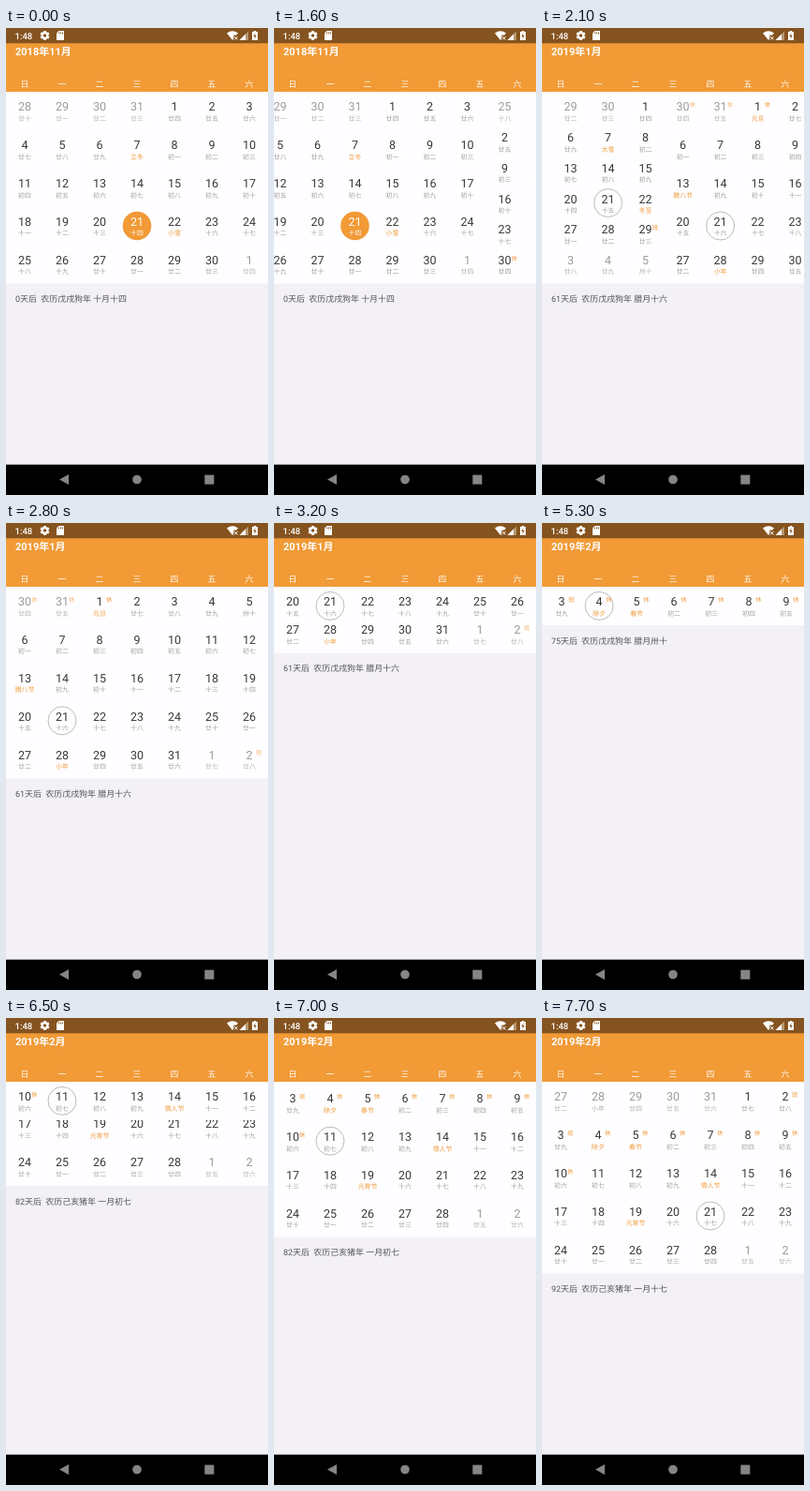
Write an HTML page with a canvas that moves like this. It is 280 by 498 pixels and loops after 8000 ms.

```html
<!DOCTYPE html>
<html lang="zh-CN">
<head>
<meta charset="utf-8">
<title>日历</title>
<style>
html, body { margin: 0; width: 100%; height: 100%; overflow: hidden; background: #f3f1f5; }
canvas { display: block; width: 280px; height: 498px; }
</style>
</head>
<body>
<canvas id="stage"></canvas>
<script>
const W = 280, H = 498, LOOP = 8000, STEP = 100;
const TOP = 68, FULL = 272.5, WEEK = 109, FOLD = FULL - WEEK;
const COLUMN = W / 7, FIRST_ROW = 84;
const ORANGE = '#f19a36', PAPER = '#fefdff';
const FONT = 'Roboto, "Noto Sans CJK SC", "Noto Sans CJK", sans-serif';

const canvas = document.getElementById('stage');
const ctx = canvas.getContext('2d');
const ratio = window.devicePixelRatio || 1;
canvas.width = W * ratio;
canvas.height = H * ratio;
ctx.textRendering = 'geometricPrecision';

// Dates are whole day numbers.
const day = (y, m, d) => Date.UTC(y, m - 1, d) / 864e5;
const parts = n => {
  const date = new Date(n * 864e5);
  return { y: date.getUTCFullYear(), m: date.getUTCMonth() + 1, d: date.getUTCDate(), w: date.getUTCDay() };
};

const TODAY = day(2018, 11, 21);
const NEW_YEAR = day(2019, 2, 5);
const LUNAR_MONTHS = [
  [NEW_YEAR, '一月'], [day(2019, 1, 6), '腊月'], [day(2018, 12, 7), '冬月'],
  [day(2018, 11, 8), '十月'], [day(2018, 10, 9), '九月']
];
const FESTIVALS = {
  '11-7': '立冬', '11-22': '小雪', '12-7': '大雪', '12-22': '冬至', '12-25': '圣诞节',
  '1-1': '元旦', '1-13': '腊八节', '1-28': '小年', '2-4': '除夕', '2-5': '春节',
  '2-14': '情人节', '2-19': '元宵节'
};

function lunar(n) {
  const [start, month] = LUNAR_MONTHS.find(([first]) => n >= first);
  const d = n - start + 1;
  const tens = d === 10 ? '初' : '初十廿卅'[Math.floor(d / 10)];
  return { month, name: tens + '十一二三四五六七八九'[d % 10] };
}

// Days off run around each new year; a working day stands beside them.
function mark(n) {
  const solar = n - day(2019, 1, 1), spring = n - NEW_YEAR;
  if (solar === -3 || spring === -3 || spring === -2) return '班';
  if ((solar >= -2 && solar <= 0) || (spring >= -1 && spring <= 5)) return '休';
  return '';
}

// Each gesture eases its axes by a distance; its pick applies halfway through.
const GESTURES = [
  { start: 1346, span: 700, month: W, pick: day(2018, 12, 21) },
  { start: 1742, span: 700, month: W, pick: day(2019, 1, 21) },
  { start: 2750, span: 700, fold: FOLD },
  { start: 4120, span: 500, week: W, pick: day(2019, 1, 28) },
  { start: 4850, span: 500, week: W, month: W, pick: day(2019, 2, 4) },
  { start: 5420, span: 400, week: W, pick: day(2019, 2, 11) },
  { start: 6243, span: 400, fold: -FOLD + 78 },
  { start: 6750, span: 500, fold: -78 },
  { start: 7700, span: 0, pick: day(2019, 2, 21) }
];

const easeInOut = u => u < 0.5 ? 4 * u ** 3 : 1 - 4 * (1 - u) ** 3;

function offset(axis, t) {
  return GESTURES.filter(g => g[axis]).reduce((sum, g) => {
    const u = Math.min(1, Math.max(0, (t - g.start) / g.span));
    return sum + g[axis] * easeInOut(u);
  }, 0);
}

function selectedAt(t) {
  const done = GESTURES.filter(g => g.pick && t >= g.start + g.span / 2);
  return done.length ? done.pop().pick : TODAY;
}

function rect(x, y, w, h, color) {
  ctx.fillStyle = color;
  ctx.fillRect(x, y, w, h);
}

function text(str, x, baseline, size, color, align = 'center', weight = 400) {
  ctx.font = `${weight} ${size}px ${FONT}`;
  ctx.textAlign = align;
  ctx.fillStyle = color;
  ctx.fillText(str, x, baseline);
}

function shape(points, color) {
  ctx.beginPath();
  points.forEach(([x, y]) => ctx.lineTo(x, y));
  ctx.closePath();
  ctx.fillStyle = color;
  ctx.fill();
}

function disc(x, y, r, color) {
  ctx.beginPath();
  ctx.arc(x, y, r, 0, Math.PI * 2);
  ctx.fillStyle = color;
  ctx.fill();
}

function ring(x, y, r, color) {
  ctx.beginPath();
  ctx.arc(x, y, r, 0, Math.PI * 2);
  ctx.strokeStyle = color;
  ctx.lineWidth = 0.8;
  ctx.stroke();
}

function clipped(y, h, draw) {
  ctx.save();
  ctx.beginPath();
  ctx.rect(0, y, W, h);
  ctx.clip();
  draw();
  ctx.restore();
}

function drawDay(n, x, y, selected, faded) {
  const { m, d } = parts(n);
  const festival = FESTIVALS[m + '-' + d];
  const filled = selected && n === TODAY;
  if (filled) disc(x, y + 4.4, 15.3, ORANGE);
  else if (selected) ring(x, y + 4.4, 15, '#aaa9ac');

  const ink = filled ? '#fff' : faded ? '#9b9a9d' : '#383838';
  const note = filled ? '#fff' : faded ? '#b2b1b4' : festival ? ORANGE : '#a09fa2';
  text(d, x, y + 4.4, 12.5, ink);
  text(festival || lunar(n).name, x, y + 14.8, 6.9, note);
  ctx.globalAlpha = faded ? 0.7 : 1;
  text(mark(n), x + 10.3, y, 6.4, ORANGE);
  ctx.globalAlpha = 1;
}

function drawWeek(first, x, y, selected, month) {
  for (let i = 0; i < 7; i++) {
    const n = first + i;
    drawDay(n, x + (i + 0.5) * COLUMN, y, n === selected, month && parts(n).m !== month);
  }
}

function monthGrid(y, m) {
  const start = day(y, m, 1), lead = parts(start).w;
  const rows = Math.ceil((lead + day(y, m + 1, 1) - start) / 7);
  return { m, first: start - lead, rows, pitch: FOLD / (rows - 1), pick: day(y, m, 21) };
}

const MONTHS = [monthGrid(2018, 11), monthGrid(2018, 12), monthGrid(2019, 1), monthGrid(2019, 2)];
const FIRST_WEEK = day(2019, 1, 20);

function drawPages(scroll, drawPage) {
  for (let i = 0; i < 4; i++) {
    const x = i * W - scroll;
    if (Math.abs(x) < W) drawPage(i, x);
  }
}

function drawCalendar(t, selected) {
  const fold = offset('fold', t), scroll = offset('month', t);
  const bottom = FULL - fold;
  rect(0, TOP, W, bottom - TOP, PAPER);

  clipped(TOP, bottom - TOP, () => drawPages(scroll, (i, x) => {
    const { m, first, rows, pitch, pick } = MONTHS[i];
    const chosen = parts(selected).m === m ? selected : pick;
    for (let r = 0; r < rows; r++) {
      drawWeek(first + r * 7, x, FIRST_ROW + r * pitch - fold, chosen, m);
    }
  }));

  // The week strip sticks once its row reaches the top.
  const grid = MONTHS[Math.round(scroll / W)];
  const stickAt = Math.floor((selected - grid.first) / 7) * grid.pitch;
  if (fold > 0 && (fold >= stickAt || fold === FOLD)) {
    clipped(TOP, WEEK - TOP, () => {
      rect(0, TOP, W, WEEK - TOP, PAPER);
      drawPages(offset('week', t), (i, x) => {
        const first = FIRST_WEEK + i * 7;
        drawWeek(first, x, FIRST_ROW, first + 1);
      });
    });
  }

  const { month, name } = lunar(selected);
  const year = selected >= NEW_YEAR ? '己亥猪年' : '戊戌狗年';
  text(`${selected - TODAY}天后\u00a0 农历${year} ${month}${name}`, 10, bottom + 19.7, 8.95, '#555457', 'left');
}

function drawStatusBar() {
  const white = '#fff', dim = '#b99873', bar = '#85531f';
  rect(0, 0, W, 16.3, bar);
  text('1:48', 9.5, 11.6, 9.5, white, 'left', 500);

  // Gear
  for (let i = 0; i < 6; i++) {
    ctx.save();
    ctx.translate(41.5, 8);
    ctx.rotate(i * Math.PI / 3);
    rect(-1.3, -5, 2.6, 3, white);
    ctx.restore();
  }
  disc(41.5, 8, 3.9, white);
  disc(41.5, 8, 1.7, bar);

  // Memory card
  shape([[56.5, 3], [62, 3], [62, 13], [54, 13], [54, 5.5]], white);
  for (let i = 0; i < 3; i++) rect(56.3 + i * 1.9, 4.4, 0.9, 2, bar);

  // Wi-Fi fan with a cross
  ctx.beginPath();
  ctx.moveTo(242, 13);
  ctx.lineTo(236, 5.5);
  ctx.quadraticCurveTo(242, 1.2, 248, 5.5);
  ctx.fillStyle = white;
  ctx.fill();
  rect(243.3, 7.6, 5, 6, bar);
  ctx.beginPath();
  ctx.moveTo(244, 9);
  ctx.lineTo(247.5, 12.5);
  ctx.moveTo(247.5, 9);
  ctx.lineTo(244, 12.5);
  ctx.strokeStyle = white;
  ctx.lineWidth = 1;
  ctx.stroke();

  // Signal
  shape([[249.5, 13], [259, 3.5], [259, 13]], dim);
  shape([[249.5, 13], [256, 6.5], [256, 13]], white);

  // Battery
  rect(263, 4, 6, 9, white);
  rect(264.8, 3, 2.4, 1, white);
  shape([[266.4, 5.3], [264.4, 9], [265.8, 9], [265.6, 11.7], [267.6, 8], [266.2, 8]], bar);
}

function drawHeader(selected) {
  const { y, m } = parts(selected);
  rect(0, 16, W, TOP - 16, ORANGE);
  text(`${y}年${m}月`, 10, 28.7, 11, '#fff', 'left', 700);
  [...'日一二三四五六'].forEach((c, i) => text(c, (i + 0.5) * COLUMN, 63, 8.8, '#fff'));
}

function drawNavBar() {
  const grey = '#858585';
  rect(0, 465.6, W, H, '#000');
  shape([[57, 481.5], [67, 476], [67, 487]], grey);
  disc(140, 481.5, 4.8, grey);
  rect(212.3, 476.6, 10, 10, grey);
}

function draw(t) {
  const selected = selectedAt(t);
  ctx.setTransform(ratio, 0, 0, ratio, 0, 0);
  rect(0, 0, W, H, '#f3f1f5');
  drawCalendar(t, selected);
  drawHeader(selected);
  drawStatusBar();
  drawNavBar();
}

const began = performance.now();
function tick() {
  const t = (performance.now() - began) % LOOP;
  draw(Math.floor(t / STEP) * STEP);
  requestAnimationFrame(tick);
}
tick();
</script>
</body>
</html>
```
